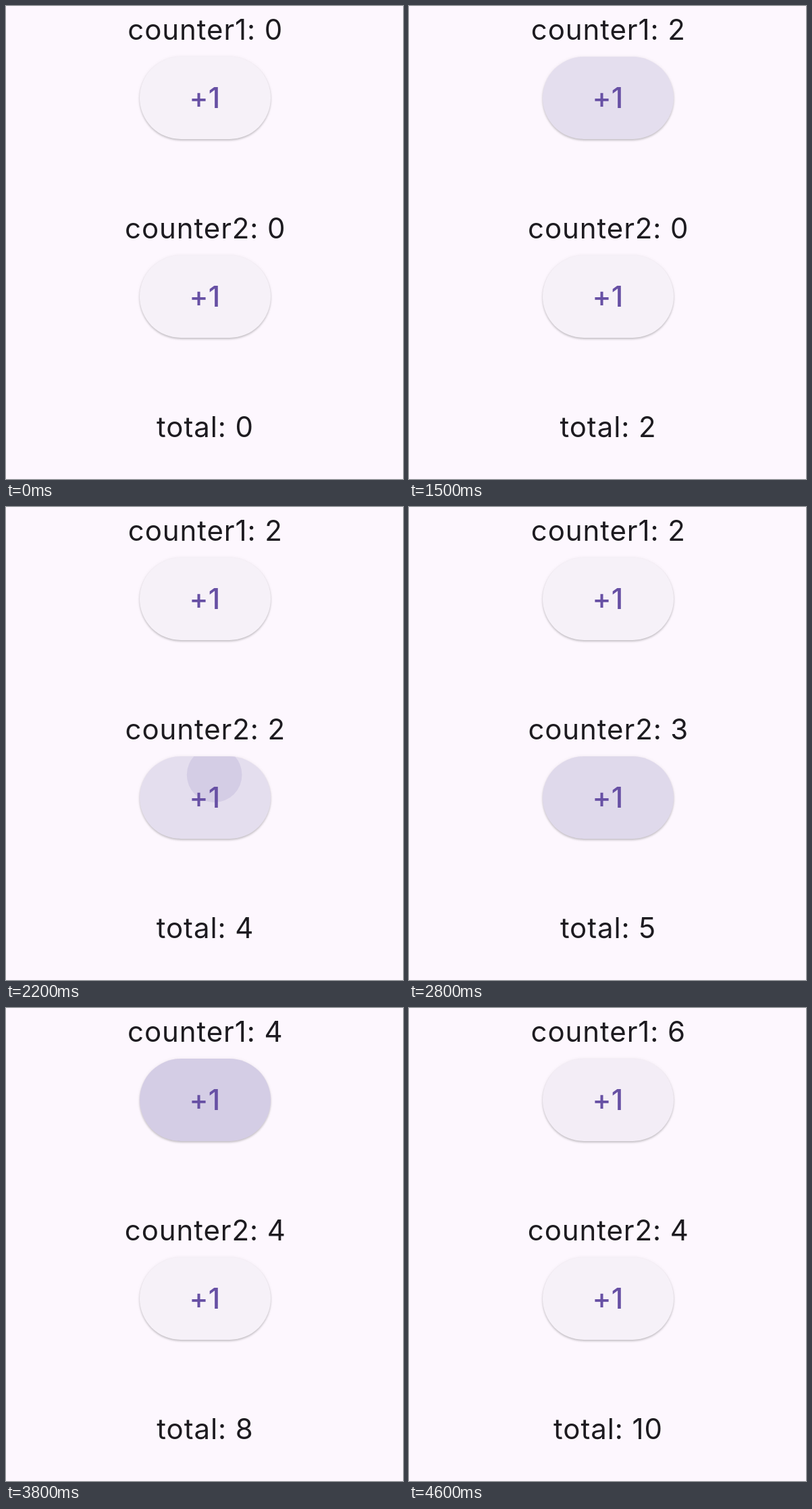
An HTML page for the animation above (4700 ms loop, 588x700 px).

```html
<!DOCTYPE html>
<html lang="en">
<head>
<meta charset="utf-8">
<title>Counters</title>
<style>
  html, body { margin: 0; width: 100%; height: 100%; overflow: hidden; background: #fdf7fe; }
  svg { display: block; }
  text { font: 400 42px Inter, Roboto, sans-serif; letter-spacing: .9px; text-anchor: middle; fill: #1d1b20; }
  .label { font-weight: 500; letter-spacing: .3px; fill: #6750a4; }
  .button { fill: #f6f1f8; filter: drop-shadow(0 2.5px 1.5px #0003) drop-shadow(0 0 2px #0001); }
  .overlay { fill: #6750a4; fill-opacity: .12; }
</style>
</head>
<body>
<svg id="stage" width="588" height="700" viewBox="0 0 588 700"></svg>
<script>
const LOOP = 4700, STEP = 100, TAP = 50;

// Top edge of each button and the times it is pressed
const buttons = [
  { y: 75, presses: [690, 1210, 3340, 3595, 3890, 4180] },
  { y: 369, presses: [1730, 2140, 2530, 2870] }
];

const shape = y => `x="198" y="${y}" width="194" height="122" rx="61"`;
const stage = document.getElementById("stage");
stage.innerHTML = buttons.map(({ y }, i) => `
  <clipPath id="clip${i}"><rect ${shape(y)}/></clipPath>
  <text class="count" x="295.3" y="${y - 25.5}"></text>
  <rect class="button" ${shape(y)}/>
  <rect class="overlay highlight" ${shape(y)}/>
  <circle class="overlay ripple" clip-path="url(#clip${i})"/>
  <text class="label" x="294.5" y="${y + 76}">+1</text>`).join("") +
  `<text id="total" x="295" y="637.5"></text>`;

const all = name => stage.querySelectorAll("." + name);
const counts = all("count"), highlights = all("highlight"), ripples = all("ripple");
const total = document.getElementById("total");
const mix = (a, b, k) => a + (b - a) * k;
const ramp = (t, from, to) => Math.max(0, Math.min(1, (t - from) / (to - from)));

function draw(t) {
  let sum = 0;
  buttons.forEach(({ y, presses }, i) => {
    const past = presses.filter(p => p <= t);
    const count = past.filter(p => p + TAP <= t).length;
    const age = past.length ? t - past[past.length - 1] : Infinity;
    const spread = ramp(age, 0, 200) ** 2;
    sum += count;
    counts[i].textContent = `counter${i + 1}: ${count}`;
    highlights[i].setAttribute("opacity", ramp(age, 0, 50) * ramp(age, 300, 210));
    ripples[i].setAttribute("opacity", ramp(age, 450, 275));
    ripples[i].setAttribute("cx", mix(310, 295, spread));
    ripples[i].setAttribute("cy", y + mix(24, 61, spread));
    ripples[i].setAttribute("r", mix(33, 120, spread));
  });
  total.textContent = `total: ${sum}`;
}

function tick() {
  const t = performance.now() % LOOP;
  draw(Math.floor(t / STEP) * STEP);
  requestAnimationFrame(tick);
}
tick();
</script>
</body>
</html>
```
